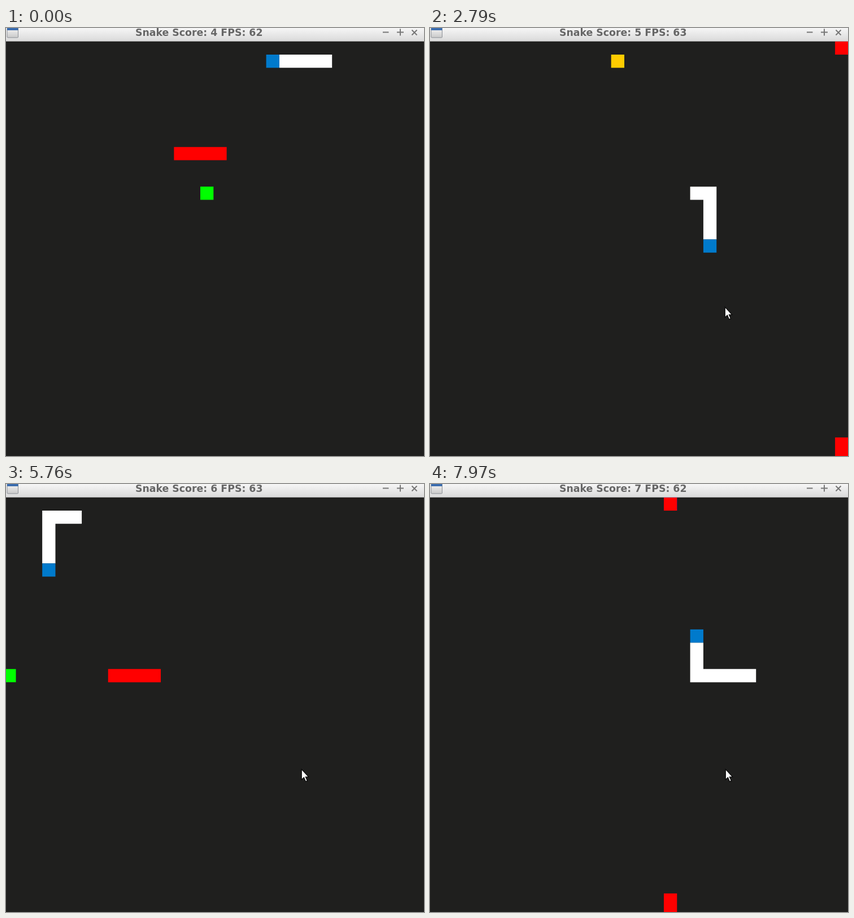
Animation of 740 by 756 pixels, one loop 8000 ms. Source, as an HTML page with a canvas:

```html
<!DOCTYPE html>
<html lang="en">
<head>
<meta charset="utf-8">
<title>Snake</title>
<style>
  html, body { margin: 0; width: 100%; height: 100%; overflow: hidden; background: #1f1f1e; }
  canvas { display: block; }
</style>
</head>
<body>
<canvas id="stage" width="740" height="756"></canvas>
<script>
const LOOP = 8000, GRID = 32, CELL = 23.32, LEFT = -5.8, TOP = 23.65;
const ctx = document.getElementById('stage').getContext('2d');
const DIRS = { L: [-1, 0], R: [1, 0], U: [0, -1], D: [0, 1] };

// Expands a route such as "L7 D10" into grid cells that wrap at the borders.
function route(x, y, moves) {
  const cells = [{ x, y, dir: moves[0] }];
  for (const move of moves.split(' ')) {
    const dir = move[0], [dx, dy] = DIRS[dir];
    for (let n = +move.slice(1); n > 0; n--) {
      x = (x + dx + GRID) % GRID;
      y = (y + dy + GRID) % GRID;
      cells.push({ x, y, dir });
    }
  }
  return cells;
}

const snakePath = route(24, 1, 'L11 D10 R8 D4 L7 U14 L11 D12 L15 U6');
const enemyPath = route(13, 8, 'R18 U27 R19 U20');
const foods = [
  { x: 15, y: 11, color: '#00ff00' },
  { x: 14, y: 1, color: '#ffcc00' },
  { x: 0, y: 13, color: '#00ff00' },
  { x: 18, y: 0, color: '#0000ff' }
];
const mealSteps = [19, 50, 76];

// Both speed up once the first food is eaten.
const snakeStep = t => t < 1911
  ? Math.min(18, Math.floor((t - 70) / 100) + 1)
  : 19 + Math.floor((t - 1911) / 83.6);
const enemyStep = t => t < 1755
  ? Math.floor(t / 117)
  : 15 + Math.floor((t - 1755) / 101);

const countPast = (limits, value) => limits.filter(limit => value >= limit).length;

// One path for all cells of a colour leaves no seams between neighbours.
function drawCells(cells, color) {
  ctx.fillStyle = color;
  ctx.beginPath();
  for (const { x, y } of cells) ctx.rect(LEFT + x * CELL, TOP + y * CELL, CELL, CELL);
  ctx.fill();
}

function drawGame(t) {
  const step = snakeStep(t), eaten = countPast(mealSteps, step);
  drawCells([foods[eaten]], foods[eaten].color);

  const front = enemyStep(t) + 3;
  const size = enemyPath[front].dir === 'U' ? 3 : 4;
  drawCells(enemyPath.slice(front - size + 1, front + 1), '#ff0000');

  const head = step + 4;
  drawCells(snakePath.slice(head - 4 - eaten, head), '#ffffff');
  drawCells([snakePath[head]], '#007acc');
}

function gradient(bottom, from, to) {
  const fill = ctx.createLinearGradient(0, 0, 0, bottom);
  fill.addColorStop(0, from);
  fill.addColorStop(1, to);
  return fill;
}

function drawTitleBar(t) {
  ctx.fillStyle = gradient(24, '#f6f6f6', '#d9d9d9');
  ctx.fillRect(0, 0, 740, TOP);

  // Window icon
  ctx.fillStyle = '#8b8f96';
  ctx.beginPath();
  ctx.roundRect(1.5, -4, 20.5, 21.5, 2);
  ctx.fill();
  ctx.fillStyle = gradient(17, '#f4f4f4', '#c9c9c9');
  ctx.fillRect(2.5, 0, 18.5, 16.5);
  ctx.fillStyle = '#3a6cae';
  ctx.fillRect(2, 0, 19.5, 4);

  const score = 4 + countPast([2340, 5340, 7340], t);
  const fps = t >= 340 && t < 6340 ? 63 : 62;
  ctx.fillStyle = '#666666';
  ctx.font = 'bold 17.33px "DejaVu Sans", sans-serif';
  ctx.fillText(`Snake Score: ${score} FPS: ${fps}`, 229, 13.5);

  // Minimise, maximise, close
  ctx.strokeStyle = '#777777';
  ctx.lineWidth = 2;
  ctx.stroke(new Path2D('M667 7.5H677.5 M692 7.5H704 M698 1.5V13.5 M718.5 3.5L727.5 12.5 M727.5 3.5L718.5 12.5'));
}

const arrow = new Path2D('M0 0V18.5L4.2 14.6L7.2 21.8L10.2 20.5L7.2 13.5H12.5Z');
const cursorKeys = [
  [230, 505, 539], [470, 484, 425], [1000, 484, 425], [1390, 512, 477], [1620, 522, 492],
  [2800, 522, 492], [2900, 522, 494], [4250, 522, 494], [4450, 523, 503], [LOOP, 523, 503]
];

function drawCursor(t) {
  const next = cursorKeys.findIndex(key => key[0] > t);
  if (next < 1) return;
  const [t0, x0, y0] = cursorKeys[next - 1], [t1, x1, y1] = cursorKeys[next];
  const k = (t - t0) / (t1 - t0);
  ctx.save();
  ctx.translate(Math.round(x0 + (x1 - x0) * k) + 0.2, Math.round(y0 + (y1 - y0) * k) + 0.8);
  ctx.fillStyle = '#ffffff';
  ctx.strokeStyle = '#0a0a0a';
  ctx.lineWidth = 1.3;
  ctx.fill(arrow);
  ctx.stroke(arrow);
  ctx.restore();
}

const start = performance.now();
function draw() {
  const t = (performance.now() - start) % LOOP;
  ctx.fillStyle = '#1f1f1e';
  ctx.fillRect(0, 0, 740, 756);
  drawGame(t);
  drawTitleBar(t);
  drawCursor(t);
  requestAnimationFrame(draw);
}
draw();
</script>
</body>
</html>
```
